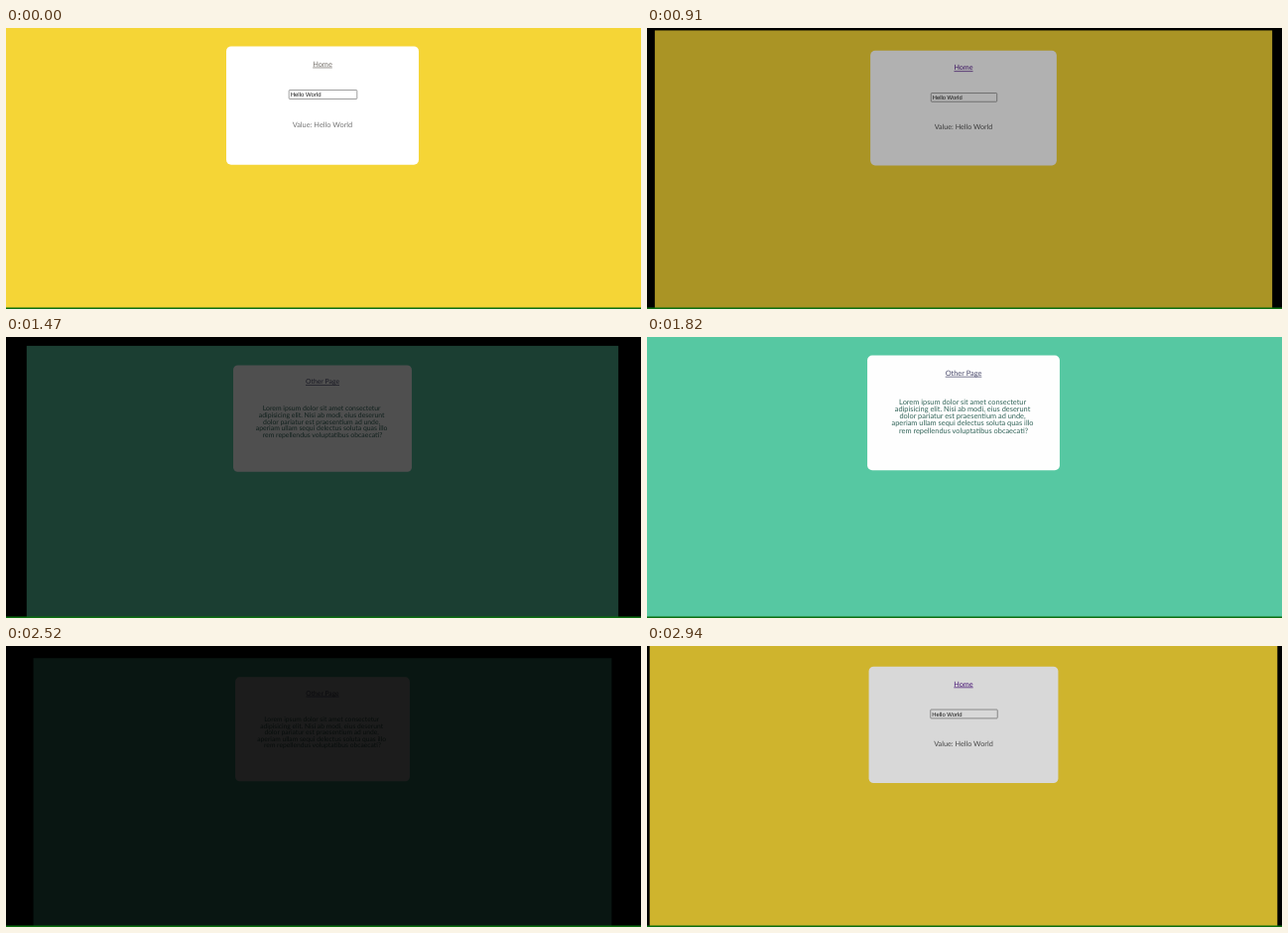
An HTML page for the animation above (3010 ms loop, 640 by 283 pixels).

```html
<!DOCTYPE html>
<html lang="en">
<head>
<meta charset="utf-8">
<title>Page transition</title>
<style>
  html, body { margin: 0; height: 100%; overflow: hidden; background: #000; }
  svg { display: block; width: 100%; height: 100%; }
  text { font: 7.4px Lato, sans-serif; text-anchor: middle; text-rendering: geometricPrecision; }
  .link { text-decoration: underline; }
  .card { fill: #fff; }
  .field { font: 6px "Liberation Sans", Arial, sans-serif; text-anchor: start; fill: #1c1c1c; }
  #home .link { fill: #551a8b; }
  #home .value { fill: #555; }
  #home.rest .link { fill: #77726c; }
  #home.rest .value { fill: #757575; }
  #other .link { fill: #4a4a6c; }
  #other .body { fill: #33655a; }
</style>
</head>
<body>
<svg viewBox="0 0 640 283">
  <g id="home">
    <rect x="-2.5" y="-2.7" width="643" height="319.4" fill="#f5d536"/>
    <rect class="card" x="222" y="18.4" width="194" height="119.4" rx="5"/>
    <text class="link" x="319" y="38.6">Home</text>
    <rect x="285.2" y="62.5" width="68.6" height="9" rx=".8" fill="#fff" stroke="#767676" stroke-width=".7"/>
    <text class="field" x="286.7" y="69.2">Hello World</text>
    <text class="value" x="319" y="100">Value: Hello World</text>
  </g>
  <g id="other">
    <rect x="-2.5" y="-2.7" width="643" height="319.4" fill="#57c9a3"/>
    <rect class="card" x="222" y="18.4" width="194" height="115.8" rx="5"/>
    <text class="link" x="319" y="38.7">Other Page</text>
    <text class="body" y="68">
      <tspan x="319">Lorem ipsum dolor sit amet consectetur</tspan>
      <tspan x="319" dy="7.13">adipisicing elit. Nisi ab modi, eius deserunt</tspan>
      <tspan x="319" dy="7.13">dolor pariatur est praesentium ad unde,</tspan>
      <tspan x="319" dy="7.13">aperiam ullam sequi delectus soluta quas illo</tspan>
      <tspan x="319" dy="7.13">rem repellendus voluptatibus obcaecati?</tspan>
    </text>
  </g>
  <rect y="281.5" width="640" height="1.5" fill="#0b6e0f"/>
</svg>
<script>
  const LOOP = 3010, STEP = 70;
  const home = document.getElementById('home');
  const other = document.getElementById('other');

  const clamp = v => Math.min(1, Math.max(0, v));
  const enter = (t, start) => 1 - (1 - clamp((t - start) / 472)) ** 2.5;
  const leave = (t, start) => 1 - clamp((t - start) / 460);

  // Opacity and scale move together around the page centre.
  function show(page, amount) {
    const scale = 0.895 + 0.105 * amount;
    page.setAttribute('opacity', amount);
    page.setAttribute('transform', `translate(319 157) scale(${scale}) translate(-319 -157)`);
    page.classList.toggle('rest', amount === 1);
  }

  function render(now) {
    const t = Math.floor((now % LOOP) / STEP) * STEP;
    show(home, t < 2000 ? leave(t, 769) : enter(t, 2691));
    show(other, t < 2000 ? enter(t, 1405) : leave(t, 2110));
  }

  const begin = performance.now();
  function tick() {
    render(performance.now() - begin);
    requestAnimationFrame(tick);
  }
  tick();
</script>
</body>
</html>
```
